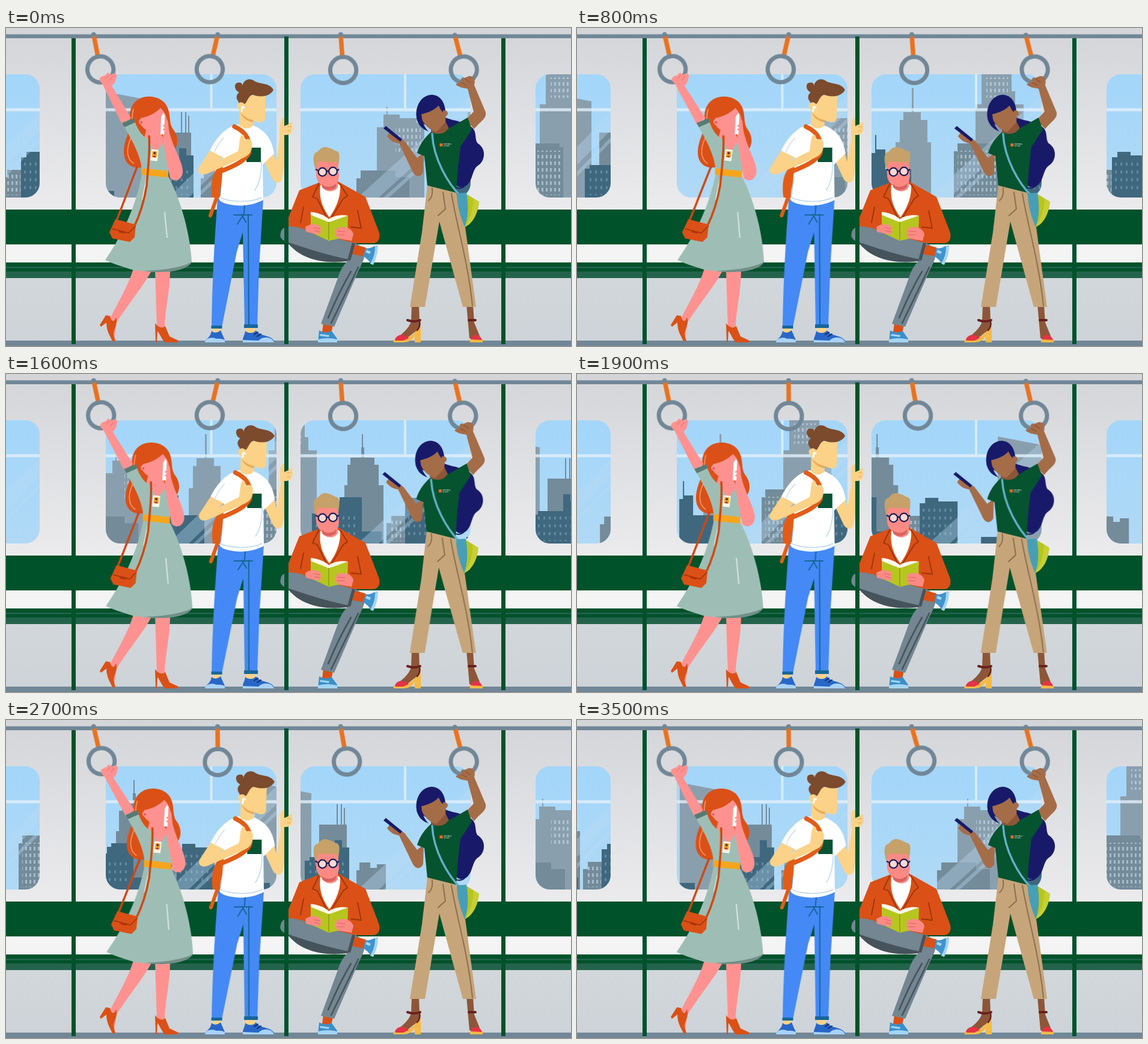
An HTML page without scripts that plays this animation: 940 by 529 pixels, repeating every 3.6 s.

```html
<!DOCTYPE html>
<html lang="en">
<head>
<meta charset="utf-8">
<title>Morning train</title>
<style>
html, body { margin: 0; height: 100%; overflow: hidden; background: #d9dbdf; }
svg { display: block; width: 100vw; height: 100vh; }
.badge { font: 700 2.4px Inter, Arial, sans-serif; fill: #dfe8e2; }

.line { fill: none; stroke-linecap: round; stroke-linejoin: round; }
.green { fill: #00522b; }
.steel { fill: #718797; }
.far { fill: #8a9fae; }
.mid { fill: #748b9a; }
.near { fill: #3f687f; }
.rust { fill: #db5016; }
.pink { fill: #ff9290; }
.dress { fill: #9ebeb5; }
.sand { fill: #fbd287; }
.denim { fill: #4489f6; }
.slate { fill: #738691; }
.rose { fill: #fb8a84; }
.navy { fill: #181a69; }
.brown { fill: #a56c48; }
.gold { fill: #f6b944; }

.city { animation: ride 3.6s infinite; }
@keyframes ride {
  0% { transform: translateX(0); animation-timing-function: steps(4); }
  11.111% { transform: translateX(-123px); animation-timing-function: steps(8); }
  33.333% { transform: translateX(-327px); animation-timing-function: steps(4); }
  44.444% { transform: translateX(-451px); animation-timing-function: steps(7); }
  63.889% { transform: translateX(-670px); animation-timing-function: steps(4); }
  75% { transform: translateX(-831px); animation-timing-function: steps(8); }
  97.222% { transform: translateX(-1074px); animation-timing-function: steps(1); }
  100% { transform: translateX(-1090px); }
}

.swing { animation: swing 3.6s steps(4) infinite; }
@keyframes swing {
  0%, 22.222%, 44.444%, 66.667%, 88.889% { transform: rotate(13deg); }
  11.111%, 33.333%, 55.556%, 77.778%, 100% { transform: rotate(-5deg); }
}
.dangle { animation: dangle 3.6s steps(2) infinite; }
@keyframes dangle {
  0%, 11.111%, 22.222%, 33.333%, 44.444%, 55.556%, 66.667%, 77.778%, 88.889% { transform: rotate(-4deg); }
  5.556%, 27.778%, 50%, 72.222% { transform: rotate(-16deg); }
  16.667%, 38.889%, 61.111%, 83.333% { transform: rotate(8deg); }
  97.222%, 100% { transform: rotate(-16deg); }
}

.lean { transform-origin: 0 520px; animation: lean 1.8s infinite; }
.reach { transform-origin: 0 47px; animation: reach 1.8s infinite; }
.pull { animation: pull 1.8s infinite; }
@keyframes lean {
  0% { transform: skewX(0); animation-timing-function: ease-out; }
  22%, 72% { transform: skewX(-.93deg); animation-timing-function: ease-in; }
  100% { transform: skewX(0); }
}
@keyframes reach {
  0% { transform: skewX(0); animation-timing-function: ease-out; }
  22%, 72% { transform: skewX(3.18deg); animation-timing-function: ease-in; }
  100% { transform: skewX(0); }
}
@keyframes pull {
  0% { transform: rotate(-11deg); animation-timing-function: ease-out; }
  22%, 72% { transform: rotate(-13deg); animation-timing-function: ease-in; }
  100% { transform: rotate(-11deg); }
}

.shift { transform-origin: 0 520px; animation: shift 3.6s ease-in-out infinite; }
@keyframes shift {
  0%, 33.333%, 63.889%, 100% { transform: skewX(0); }
  11.111%, 44.444%, 75%, 97.222% { transform: skewX(-.25deg); }
}
.nod { transform-origin: 0 520px; animation: nod 3.6s ease-in-out infinite; }
.tug { animation: tug 3.6s ease-in-out infinite; }
@keyframes nod {
  0%, 20%, 73%, 100% { transform: skewX(0); }
  32%, 65% { transform: skewX(.28deg); }
}
@keyframes tug {
  0%, 20%, 73%, 100% { transform: rotate(-14.7deg); }
  32%, 65% { transform: rotate(-13.2deg); }
}
</style>
</head>
<body>
<svg viewBox="0 0 940 529" preserveAspectRatio="none">
<defs>
  <linearGradient id="wall" x2="0" y2="1">
    <stop offset="0" stop-color="#d3d5d9"/><stop offset=".57" stop-color="#ebebed"/>
    <stop offset=".78" stop-color="#d2d7db"/><stop offset="1" stop-color="#cdd3d8"/>
  </linearGradient>
  <linearGradient id="sky" x2="0" y2="1">
    <stop offset="0" stop-color="#a3d6fa"/><stop offset="1" stop-color="#b0d9f5"/>
  </linearGradient>
  <pattern id="panes" width="7" height="11" patternUnits="userSpaceOnUse">
    <path d="M2 2h3v6h-3z" fill="#c4dcea" opacity=".6"/>
  </pattern>
  <pattern id="lamps" width="9" height="13" patternUnits="userSpaceOnUse">
    <path d="M3 3h3v5h-3z" fill="#8db0c3" opacity=".45"/>
  </pattern>
  <clipPath id="glass">
    <rect x="-60" y="77" width="116" height="205" rx="24"/>
    <rect x="166" y="77" width="284" height="205" rx="24"/>
    <rect x="490" y="77" width="283" height="205" rx="24"/>
    <rect x="881" y="77" width="120" height="205" rx="24"/>
  </clipPath>
  <g id="block">
    <g class="far">
      <path d="M155 104L249 122V282H155z"/>
      <path d="M617 282V165H628V144H633V131h2V144H655V150H683V158H696V282z"/>
      <path d="M755 282V190H762V153H768V140H782V100h3V140H797V153H808V190H814V282z"/>
      <path d="M888 282V127H898V76H948V105H954V127H968V282z"/>
    </g>
    <path d="M648 164h42v44h-42zM906 82h36v34h-36z" fill="url(#panes)"/>
    <g class="mid">
      <path d="M262 174H291V140h2V174H298V140h2V174H303V146h2V174H308V282H262z"/>
      <path d="M1014 282V185H1019V151H1024V139H1042V122H1043V100h2V122H1047V139H1064V151H1071V185H1079V282z"/>
      <path d="M-6 282V248H2V236H26V282z"/>
      <path d="M324 282V250H329V237H347V246H358V240H373V282z"/>
      <path d="M583 282V250H590V237H648V248H671V282z"/>
      <path d="M852 282V205H858V192H921V198H927V282z"/>
    </g>
    <path d="M0 244h24v34h-24zM858 204h64v74h-64z" fill="url(#panes)"/>
    <g class="near">
      <path d="M25 282V215H34V206H56V212H88V282z"/>
      <path d="M127 271H180V282H127z"/>
      <path d="M238 282V234H246V228H288V200H300V212H312V282z"/>
      <path d="M715 282V208H721V178h2V202H738V235H781V282z"/>
      <path d="M960 282V232H970V222H999V211H1006V205H1043V262H1076V282z"/>
    </g>
    <path d="M30 220h54v56h-54zM244 236h60v42h-60zM966 230h72v46h-72z" fill="url(#lamps)"/>
  </g>
  <g id="strap">
    <path class="line" d="M0 2V36" stroke="#e9721f" stroke-width="7.500"/>
    <circle cy="58" r="21.7" fill="none" stroke="#718797" stroke-width="7"/>
    <circle cy="-1" r="4" class="steel"/>
  </g>
</defs>

<rect width="940" height="529" fill="url(#wall)"/>

<g clip-path="url(#glass)">
  <rect y="77" width="940" height="205" fill="url(#sky)"/>
  <g class="city"><use href="#block"/><use href="#block" x="1090"/></g>
  <g fill="#b9dcf3" opacity=".36">
    <path d="M-60 260L56 140V170L-60 290zM-60 300L56 182V190L-60 308z"/>
    <path d="M270 282L450 110V140L304 282zM312 282L450 150V158L320 282z"/>
    <path d="M585 282L773 112V144L620 282zM628 282L773 152V160L637 282z"/>
  </g>
  <path d="M0 133.500H940v5H0zM339.500 77h4v57h-4zM662 77h4v57h-4z" fill="#e3f1fa" opacity=".8"/>
</g>

<rect y="10.500" width="940" height="6.500" class="steel"/>
<rect y="302" width="940" height="58" class="green"/>
<rect y="360" width="940" height="30" fill="#f4f4f5"/>
<rect y="390" width="940" height="15" class="green"/>
<path d="M0 397H940v2.500H0zM0 405H940v11H0z" fill="#24634c"/>
<rect y="520" width="940" height="9" class="steel"/>
<path d="M109 17h7v509h-7zM824 17h7v509h-7z" class="green"/>

<g transform="translate(146 12)"><use href="#strap" class="pull"/></g>
<g transform="translate(352 12)"><use href="#strap" class="swing"/></g>
<g transform="translate(557 12)"><use href="#strap" class="dangle"/></g>
<g transform="translate(747 13)"><use href="#strap" class="tug"/></g>

<!-- caller -->
<path class="pink" d="M212 400L243 402C232 425 204 458 184 490L180 516L174 505L174 481C186 457 204 428 212 400zM248 402L273 402C273 435 266 462 264 492L266 506L251 498z"/>
<g class="rust">
  <path d="M166 478L173 479C175 488 180 491 183 481C187 492 179 500 179 510L182 521H177C173 512 167 504 167 490L158 497L156 494z"/>
  <path d="M248 491C254 499 260 500 265 496L272 513L287 520L285 523H264C258 516 255 507 252 504L251 523H249z"/>
</g>
<g class="lean">
  <path class="rust" d="M238 114C216 114 202 131 207 157C208 171 196 184 196 207C196 226 211 236 228 231L268 209C286 206 291 184 277 167C271 157 274 145 269 133C264 120 251 114 238 114z"/>
  <path class="line" d="M212 135C206 155 215 170 205 190C199 208 204 220 212 225" stroke="#f3a07c" stroke-width="1.500"/>
</g>
<g class="reach">
  <path class="pink" d="M161 94L156 88C154 81 161 80 166 78C168 73 173 74 173 78L178 76C184 74 186 79 183 84C182 92 178 94 176 96L208 150L193 160z"/>
  <path class="line" d="M166 84l5 -5M172 87l6 -7" stroke="#e5696a"/>
</g>
<g class="lean">
  <path class="pink" d="M233 170L256 172L265 190L249 211L230 183z"/>
  <path class="pink" d="M224 150C238 147 250 141 257 133C266 141 270 153 267 164C264 175 254 179 245 175C235 172 227 166 224 160z"/>
  <circle cx="226" cy="156" r="5" class="pink"/>
  <circle cx="225" cy="157" r="2" fill="#e7565c"/>
  <path class="dress" d="M194 160L213 151C218 170 228 181 237 185L248 208L263 189C270 200 275 222 270 240L226 237C225 215 211 188 194 160z"/>
  <path d="M193 158L213 150L215 157L197 165z" fill="#587a74"/>
  <path class="pink" d="M261 176L267 152C271 153 269 165 273 178C281 205 295 225 294 240C293 253 280 258 273 249L264 205z"/>
  <path d="M258 148L262 141L264 145L263 177L257 177z" fill="#fff"/>
  <path class="line" d="M262 163l6-4M262 169l7-3" stroke="#ff9290" stroke-width="2.500"/>
  <path class="dress" d="M226 243L270 247C287 278 306 335 309 389C303 400 283 405 247 406L213 403C193 397 175 391 165 386C190 350 216 300 226 243z"/>
  <path d="M228 404C262 403 294 398 309 389C304 401 278 407 247 406z" fill="#728f88"/>
  <path d="M225 233L270 238V249L225 244z" fill="#f6a51c"/>
  <path class="line" d="M264 307L268 348M234 250L227 285" stroke="#d8e6e0" stroke-width="2"/>
  <path class="line" d="M238 180C240 204 236 236 234 262Q228 300 213 331M183 323L218 231" stroke="#d0450f" stroke-width="3.500"/>
  <path class="rust" d="M182 318L216 327L214 348L206 356L177 350L172 340z"/>
  <path class="line" d="M177 334L204 341L215 330M188 339l9 2" stroke="#9e310b" stroke-width="1.500"/>
  <g transform="rotate(6 246 211)">
    <rect x="241" y="202" width="12" height="19" rx="1" fill="#fff3e4"/>
    <rect x="243" y="205" width="8" height="10" fill="#f4a12b"/>
    <circle cx="247" cy="208" r="2" fill="#57302b"/><path d="M244 215q3-6 6 0z" fill="#bc3712"/>
  </g>
</g>

<!-- standing student -->
<path class="sand" d="M344 497h13v12h-13zM399 497h15v12h-15z"/>
<path d="M342 504C348 509 353 506 357 503L364 519V523H331C331 517 340 516 342 504z" fill="#2867c8"/>
<path d="M398 504C404 509 412 508 416 503C423 514 441 510 446 521V523H394C393 515 397 512 398 504z" fill="#2867c8"/>
<path d="M331 523C331 516 343 513 350 517Q358 516 364 519V523zM394 523V519L420 520C427 512 443 513 446 523z" fill="#a8d2fa"/>
<path class="line" d="M413 510l6-4M418 513l6-4" stroke="#152c68" stroke-width="2"/>
<g class="shift">
  <path class="denim" d="M352 284H428L421 400L418 497H397L394 340L384 372L359 498H342C343 420 347 350 352 284z"/>
  <path d="M341.500 495h18v5h-18zM396 493h23v6h-23z" fill="#17669a"/>
  <path class="line" d="M403 310L404 493M379 311H409M397 294L396 308M396 309L385 326M392 310L399 323M372 292H402" stroke="#17669a" stroke-width="2"/>
  <path d="M360 226C342 238 340 258 343 282L355 283C355 260 362 246 376 232z" fill="#e25c16"/>
  <path class="sand" d="M389 130L411 145L411 162C410 172 393 173 388 162z"/>
  <path class="sand" d="M397 112H432L431 150C430 160 418 158 408 151L390 138z"/>
  <path d="M390 141C398 149 404 152 411 153L411 157C400 155 393 149 390 141z" fill="#e9ab58"/>
  <path d="M387 123C381 116 384 110 388 107C381 104 379 96 383 92C390 89 394 92 393 97C395 86 405 82 413 88C421 94 438 90 445 103C439 114 424 116 410 111C404 113 402 120 398 126L387 125z" fill="#7c4a2c"/>
  <circle cx="391" cy="130" r="6.500" class="sand"/>
  <path class="line" d="M393 131l3 1M393 132l-1 6" stroke="#fff" stroke-width="3"/>
  <path class="sand" d="M428 219L445 209L449 223L456 181C453 166 458 151 463 149L466 160L464 182C465 208 463 237 459 252C455 260 447 258 443 251z"/>
  <path d="M387 160C366 164 350 182 339 204L362 216L357 279C351 286 357 290 369 293C390 298 411 295 428 286L427 227L446 209C443 188 434 171 411 162C405 169 393 169 387 160z" fill="#fff"/>
  <path class="line" d="M425 222C425 245 421 260 414 270M356 282C372 290 407 291 425 282" stroke="#bcd8ee" stroke-width="1.500"/>
  <rect x="400" y="199" width="24" height="24" fill="#075333"/>
  <path class="line" d="M380 164C401 173 408 190 404 208C397 223 375 231 354 240" stroke="#e25c16" stroke-width="7.500"/>
  <path class="line" d="M352 278L340 312" stroke="#e25c16" stroke-width="6"/>
  <path class="sand" d="M339 204L361 215L352 222L386 205C389 196 387 181 393 177C398 178 396 184 397 187C405 180 412 189 409 198C408 211 398 215 388 219L333 243C323 246 317 239 321 232z"/>
  <path class="line" d="M362 183C355 190 350 198 347 206" stroke="#c5ddef" stroke-width="1.500"/>
</g>

<!-- reader -->
<path d="M528 490L544 494L541 508L526 506z" class="rust"/>
<path d="M521 503C530 508 537 507 541 503L551 517V523H519z" fill="#398fc9"/>
<path d="M519 518Q535 514 551 518V523H519zM523 509l15 2-1 3-15-2z" fill="#a4d5f5"/>
<path d="M521 257L488 270L470 315V334L510 348L575 358H611C622 357 623 346 620 338L598 281L552 255z" class="rust"/>
<path d="M523 262C526 255 549 255 556 262C557 285 546 304 538 315C528 301 520 285 523 262z" fill="#fff"/>
<path class="line" d="M521 258L510 281L518 284L534 317M556 260L568 279L561 284L542 315M495 298L490 324M585 304L591 333L574 331" stroke="#9b340c" stroke-width="1.800"/>
<path class="rose" d="M526 255H552V264C548 274 533 274 526 265z"/>
<path class="rose" d="M515 219H552L554 246C553 260 545 265 536 265C525 265 517 256 516 246z"/>
<path d="M524 259Q538 270 550 258L548 266Q537 273 527 266z" fill="#d9625f"/>
<path d="M515 235C511 224 510 212 515 207C521 207 521 198 532 198C543 200 547 205 551 205C557 209 554 220 553 230L549 222C538 225 527 222 519 222z" fill="#c6a169"/>
<g fill="#fbd9d2" stroke="#1a1c58" stroke-width="2.200">
  <circle cx="526.500" cy="239.500" r="6.800"/><circle cx="544" cy="238.500" r="6.800"/>
  <path d="M533 239q2-2 4 0M519 237l-4-2M551 237l3-2"/>
</g>
<path class="slate" d="M578 356L597 367C600 379 590 397 585 407L546 497L524 492L552 416C556 402 562 393 570 386z"/>
<path class="line" d="M586 398L541 491M574 405Q555 437 536 482" stroke="#46535b" stroke-width="2.500"/>
<path class="rust" d="M578 360L598 365L597 380L575 376z"/>
<path d="M598 366C606 368 610 363 618 362C619 374 614 386 610 394L606 392C604 384 595 383 595 377z" fill="#3f94cd"/>
<path d="M614 363L619 363C619 376 614 387 611 394L606 392C612 382 614 374 614 363zM600 369l7 3-2 4-7-3z" fill="#a4d5f5"/>
<path d="M462 348C485 354 530 368 573 376L569 388C528 393 485 386 462 348z" fill="#46535b"/>
<path class="slate" d="M457 341C459 328 474 327 500 336L580 358L571 385C535 378 498 366 468 356C457 353 455 346 457 341z"/>
<path d="M576 357L581 358L573 387L568 386z" fill="#46535b"/>
<path d="M507 309L537 321L569 312L568 347L537 354L507 340z" fill="#b6c61f"/>
<path d="M507 306C520 307 531 312 537 318C545 312 558 310 569 312L537 323L507 311z" fill="#fffbea"/>
<path class="line" d="M537 323V352" stroke="#8f9d14" stroke-width="1.500"/>
<path class="rose" d="M498 331C507 324 520 325 524 332L523 344L512 342L499 339zM551 333C562 328 576 333 578 343L575 354L552 350C547 344 548 337 551 333z"/>
<path class="line" d="M512 332l10 2M513 337l9 2M552 338l12 1M551 344l12 0" stroke="#dc6563"/>

<!-- texter -->
<path d="M675 460h12l1 28 1 12-12 8-12 10-16-1C658 509 670 501 674 488zM766 460h11l2 30 9 22-8 7-9-3z" fill="#8d5638"/>
<path class="gold" d="M644 519L664 517Q678 511 681 505L690 496V523H680V512Q674 523 662 523H645zM772 518H793V523H772z"/>
<path d="M647 518C652 508 663 509 670 516L661 520H648zM773 518C777 508 788 508 792 519z" fill="#e43345"/>
<path class="line" d="M668 486Q679 490 689 486M770 486H781" stroke="#69201e" stroke-width="4"/>
<path class="line" d="M688 488Q690 496 684 503" stroke="#69201e" stroke-width="2.500"/>
<g class="nod">
  <path class="navy" d="M684 154C679 127 693 111 709 111C726 112 733 130 731 149C745 155 764 155 776 166C784 174 779 185 785 192C800 201 797 222 785 229C775 236 777 254 766 262C756 268 746 264 748 250L735 180z"/>
  <path class="line" d="M742 262C762 276 771 255 772 238M733 153C751 162 765 158 778 171" stroke="#181a69" stroke-width="2"/>
  <path class="brown" d="M757 99L749 95C747 91 756 92 757 88C756 82 761 82 763 83L770 80C777 79 782 85 779 95L798 140C800 151 790 154 779 168L765 153L778 139L768 101z"/>
  <path class="line" d="M758 91l8 4M764 85l8 6" stroke="#7f4c31"/>
  <path class="brown" d="M634 180L639 173L645 176L653 181L663 188L684 216L695 207L694 240C690 248 682 249 677 240L654 192C646 191 640 188 634 180z"/>
  <path class="navy" d="M628 167L632 163L659 185L656 189z"/>
  <path d="M707 168L730 153L738 169C732 179 715 181 707 176z" fill="#8d5638"/>
  <path d="M707 173C696 183 688 194 684 208L696 213L701 263L749 275L752 233L756 198L775 169L768 149L735 168C730 177 717 178 707 173z" fill="#06532f"/>
  <path class="brown" d="M689 144C702 141 715 136 721 127L732 143L731 157L716 173C705 170 693 160 689 144z"/>
  <circle cx="730" cy="142" r="5" class="brown"/>
  <path class="navy" d="M683 149C680 125 696 111 710 112C724 113 729 126 727 140C721 135 722 130 718 128C713 137 699 141 691 143C692 155 695 164 703 172C691 168 685 160 683 149z"/>
  <path d="M701 262L749 274L764 331L782 464H760L721 322L697 464H672L692 340z" fill="#c7a57a"/>
  <path class="line" d="M741 275C749 325 769 390 776 462M709 266Q711 281 703 287M727 273L731 301L719 312" stroke="#89704f" stroke-width="2"/>
  <path class="line" d="M709 176C711 217 735 259 757 280" stroke="#61b0c8" stroke-width="3.500"/>
  <path d="M766 276L787 289C785 309 776 326 763 331z" fill="#b7c51d"/>
  <path d="M778 284L787 289C785 309 776 326 763 331Q777 311 778 284z" fill="#c6d035"/>
  <path d="M750 275L766 274C770 295 769 317 763 331C755 312 750 294 750 275z" fill="#469fb6"/>
  <rect x="721.500" y="192" width="5" height="5" fill="#e36b26"/>
  <text class="badge" x="728" y="194.300">HARTWELL</text>
  <text class="badge" x="728" y="197.300">OF VALE</text>
</g>

<rect x="463" y="14" width="7" height="512" class="green"/>
<path class="sand" d="M456 161C456 153 460 149 463 149V163L470 160C475 153 479 158 475 162C479 166 476 170 475 172C474 177 470 178 464 178H456z"/>
<path class="line" d="M468 164h6M468 171h5" stroke="#dfa652"/>
</svg>
</body>
</html>
```
